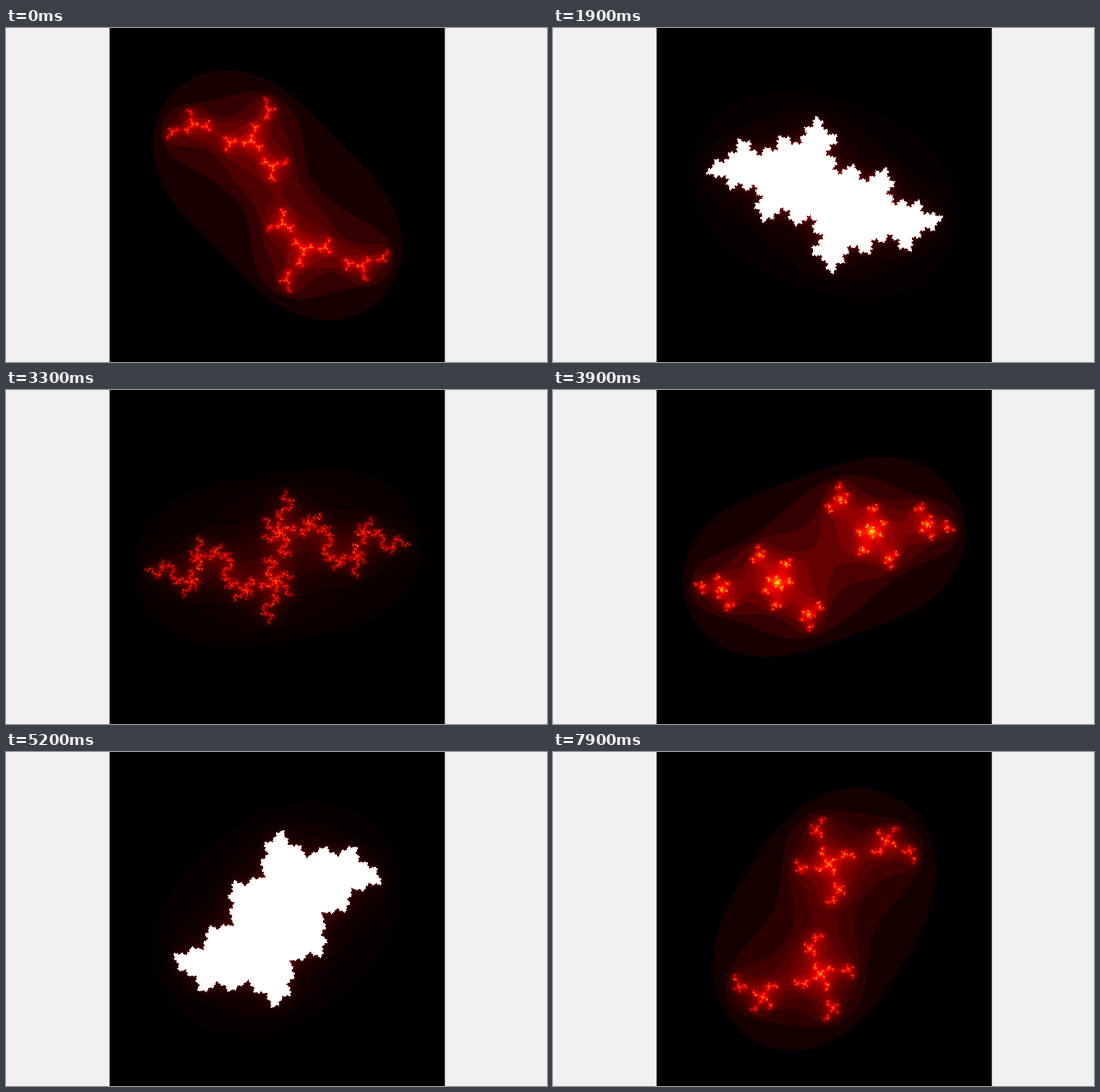
An HTML page with a canvas that plays this animation: 749 by 463 pixels, repeating every 8 s.

```html
<!DOCTYPE html>
<html>
<head>
<meta charset="utf-8">
<style>
  html, body { margin: 0; width: 100%; height: 100%; overflow: hidden; background: #f0f0f0; }
  #plot { position: absolute; left: 143px; top: 0; width: 465px; height: 463px; background: #666; }
  canvas { position: absolute; left: 1px; top: 0; clip-path: inset(0 1px 0 0); }
</style>
</head>
<body>
<div id="plot"><canvas id="view" width="464" height="463"></canvas></div>
<script>
const W = 464, H = 463, UNIT = 116, MAX_ITER = 100, STEP = 100, STEPS = 80;
const ctx = document.getElementById('view').getContext('2d');
const image = ctx.createImageData(W, H);
const pixels = new Uint32Array(image.data.buffer);
const counts = new Uint8Array(W * H);

// Path of the Julia constant: seconds, real part, imaginary part
const path = [
  [0, 0.01, 1.056], [1.2, -0.165, 0.755], [2.6, -0.87, 0.088],
  [3.2, -0.945, -0.25], [3.9, -0.79, -0.65], [4.5, -0.44, -0.75],
  [5.2, -0.12, -0.58], [6.8, 0.035, -0.417], [7.9, 0.378, -0.722]
];

const secant = (i, k) => (path[i + 1][k] - path[i][k]) / (path[i + 1][0] - path[i][0]);

function slope(i, k) {
  const last = path.length - 1;
  if (i === 0) return secant(0, k);
  if (i === last) return secant(last - 1, k);
  const before = path[i][0] - path[i - 1][0];
  const after = path[i + 1][0] - path[i][0];
  return (after * secant(i - 1, k) + before * secant(i, k)) / (before + after);
}

// Cubic Hermite interpolation along the path
function along(t, k) {
  let i = 0;
  while (i < path.length - 2 && t > path[i + 1][0]) i++;
  const h = path[i + 1][0] - path[i][0];
  const u = (t - path[i][0]) / h, v = 1 - u;
  return path[i][k] * v * v * (1 + 2 * u) + path[i + 1][k] * u * u * (3 - 2 * u)
    + h * u * v * (v * slope(i, k) - u * slope(i + 1, k));
}

function escapeCount(x, y, cx, cy) {
  for (let n = 0; n < MAX_ITER; n++) {
    const next = x * x - y * y + cx;
    y = 2 * x * y + cy;
    x = next;
    if (x * x + y * y > 4) return n;
  }
  return MAX_ITER;
}

// Black, red, yellow, white
function heat(v) {
  const level = (from, span) => Math.round(255 * Math.min(1, Math.max(0, (v - from) / span)));
  const r = level(0, 0.375), g = level(0.375, 0.375), b = level(0.75, 0.25);
  return (255 << 24 | b << 16 | g << 8 | r) >>> 0;
}

function draw(t) {
  const cx = along(t, 1), cy = along(t, 2), total = W * H;
  let top = 1;
  // The set is symmetric about its centre, so half the pixels suffice
  for (let i = 0; i < total / 2; i++) {
    const x = (i % W + 0.5 - W / 2) / UNIT;
    const y = (H / 2 - Math.floor(i / W) - 0.5) / UNIT;
    const n = escapeCount(x, y, cx, cy);
    counts[i] = counts[total - 1 - i] = n;
    if (n > top) top = n;
  }
  const palette = Array.from({ length: top + 1 }, (_, n) => heat(n / top));
  for (let i = 0; i < total; i++) pixels[i] = palette[counts[i]];
  ctx.putImageData(image, 0, 0);
}

let shown = -1;
function tick() {
  const step = Math.floor(performance.now() / STEP) % STEPS;
  if (step !== shown) {
    shown = step;
    draw(step * STEP / 1000);
  }
  requestAnimationFrame(tick);
}
tick();
</script>
</body>
</html>
```
